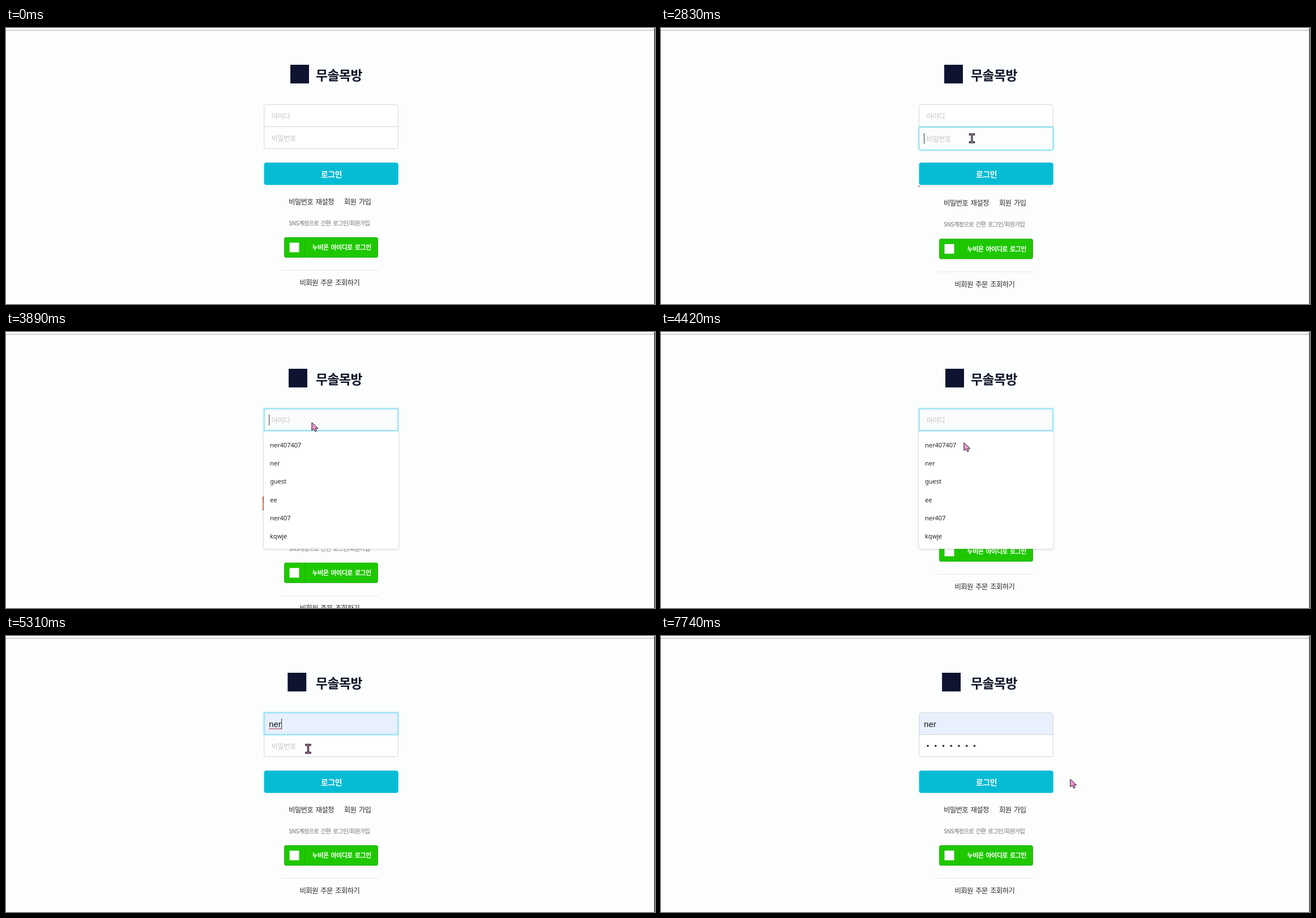
An HTML page for the animation above (8000 ms loop, 1148 by 488 pixels).

```html
<!DOCTYPE html>
<html lang="ko">
<head>
<meta charset="utf-8">
<title>Login</title>
<style>
html, body { margin: 0; width: 100%; height: 100%; overflow: hidden; background: #fcfdfd; }
svg { display: block; width: 1148px; height: 488px; }
text { font-family: "Noto Sans CJK KR", "Noto Sans CJK", sans-serif; white-space: pre; }
.md { font-size: 12.5px; letter-spacing: -.75px; word-spacing: 1.8px; fill: #2b2b2b; }
.hint { fill: #c3c5c6; font-weight: 500; }
.item { font: 11px "Noto Sans", "Open Sans", sans-serif; fill: #222; }
.typed { font: 15.5px Roboto, Inter, sans-serif; fill: #222; }
</style>
</head>
<body>
<svg viewBox="0 0 1148 488">
  <defs>
    <filter id="blur" x="-10%" y="-40%" width="120%" height="180%"><feGaussianBlur stdDeviation="1.6"/></filter>
    <linearGradient id="bar" x2="0" y2="1">
      <stop offset=".3" stop-color="#d9695d"/><stop offset=".5" stop-color="#ef9270"/><stop offset="1" stop-color="#df735f"/>
    </linearGradient>
    <clipPath id="panelClip"><rect id="panelBox" x="453.5" width="239"/></clipPath>
  </defs>
  <rect width="1148" height="488" fill="#fcfdfd"/>
  <path d="M0 4H1148" stroke="#a2a4a4" stroke-width="1.2"/>
  <path d="M1147.3 0V488" stroke="#26282a" stroke-width="1.4"/>

  <rect id="mark" y="65" width="33" height="33" fill="#0e1330"/>
  <text x="548" y="92.3" font-size="23" font-weight="900" letter-spacing="-.7" fill="#0d1528">무솔목방</text>

  <rect x="456.5" y="135.5" width="237" height="78" rx="4" fill="#fff" stroke="#d3d6d8"/>
  <path id="idFill" d="M457 174V139.5Q457 136 460.5 136H689.5Q693 136 693 139.5V174Z"/>
  <path d="M457 174.5H693" stroke="#d3d6d8"/>

  <g id="idFocus" fill="none">
    <rect x="456.5" y="135.5" width="237" height="39" rx="1" stroke="#a6e6f5" stroke-width="2" filter="url(#blur)"/>
    <rect x="456.5" y="135.5" width="237" height="39" rx="1" stroke="#72d9f0"/>
  </g>
  <g id="pwFocus">
    <rect x="456.5" y="175.5" width="237" height="40" rx="3" fill="none" stroke="#8fe0f3" stroke-width="2.6" filter="url(#blur)"/>
    <rect x="456.5" y="175.5" width="237" height="40" rx="3" fill="#fcfdfd" stroke="#62d5ee"/>
  </g>

  <text id="idHint" class="md hint" x="469.5" y="160.5">아이디</text>
  <text id="idText" class="typed" x="465" y="160.5">ner</text>
  <path id="squiggle" d="M465 164q1 -2.4 2 0t2 0t2 0t2 0t2 0t2 0t2 0t2 0t2 0t2 0t2 0" fill="none" stroke="#a8323e"/>
  <text id="pwHint" class="md hint" x="469.5">비밀번호</text>
  <g id="dots" fill="#222"></g>
  <path id="caret" stroke="#333"/>

  <rect id="button" x="456.5" y="238" width="237.5" height="39.5" rx="4"/>
  <text x="557" y="263.5" font-size="14" font-weight="700" letter-spacing="-.5" fill="#fff">로그인</text>

  <g id="panel" clip-path="url(#panelClip)">
    <rect x="453.5" y="291" width="238.5" height="27" rx="3" fill="#fde1dd"/>
    <path d="M458 291H456.5Q453.5 291 453.5 294V315Q453.5 318 456.5 318H458Z" fill="url(#bar)"/>
    <circle cx="526.5" cy="304.5" r="5" fill="#bd4a47"/>
    <path d="M526.5 301.5V305M526.5 306.3V307.6" stroke="#fff" stroke-width="1.3"/>
    <text x="535.5" y="308.6" font-size="10.5" letter-spacing="-.8" word-spacing="1.5" fill="#bd4a47">아이디를 입력해주세요</text>
  </g>

  <g id="lower">
    <text class="md" x="500" y="311.7">비밀번호 재설정</text>
    <text class="md" x="598" y="311.7">회원 가입</text>
    <text x="500" y="348.8" font-size="10.3" letter-spacing="-.65" word-spacing="1.5" fill="#707476">SNS계정으로 간편 로그인/회원가입</text>
    <rect x="492.5" y="370.5" width="165" height="35" rx="2.5" fill="#1ec800" stroke="#1cb004"/>
    <path d="M528.5 371V405" stroke="#1bb403"/>
    <rect x="501.5" y="379.5" width="17" height="17" fill="#fff"/>
    <text x="541.5" y="392.2" font-size="11.2" font-weight="700" letter-spacing="-.65" word-spacing="1.5" fill="#fff">누비온 아이디로 로그인</text>
    <path d="M486 428.5H659" stroke="#e6e8e8"/>
    <text class="md" x="519.5" y="455.2">비회원 주문 조회하기</text>
  </g>

  <g id="menu">
    <rect x="456" y="177" width="238.5" height="207" rx="4" fill="#0004" filter="url(#blur)"/>
    <rect x="456" y="176" width="238.5" height="207.5" rx="4" fill="#fff"/>
    <rect id="row" x="456" y="216" width="238.5" height="31.5" fill="#efefef"/>
  </g>

  <g id="arrow"><path d="M0 0V14L3.5 11L6 16L8.6 14.8L6.4 10.5H11Z" fill="#f09ad0" stroke="#1c1020" stroke-linejoin="round"/></g>
  <g id="beam" fill="none" stroke-linecap="square">
    <path d="M-3.5 -7H3.5M-3.5 7H3.5M0 -7V7" stroke="#1c1020" stroke-width="3.4"/>
    <path id="beamCore" d="M-3.5 -7H3.5M-3.5 7H3.5M0 -7V7" stroke-width="1.1"/>
  </g>
</svg>
<script>
const LOOP = 8000;
const PW_CLICK = 2690, ID_CLICK = 3830, PICK = 4710, TAB = 5470, BLUR = 7120;
const SVG = "http://www.w3.org/2000/svg";
const $ = id => document.getElementById(id);
const show = (id, on) => $(id).style.display = on ? "" : "none";
const set = (id, attrs) => { for (const k in attrs) $(id).setAttribute(k, attrs[k]); };
const clamp = v => Math.min(1, Math.max(0, v));
const swing = v => .5 - Math.cos(Math.PI * clamp(v)) / 2;
const within = (t, a, b) => t >= a && t < b;

function add(parent, tag, attrs, text = "") {
  const el = document.createElementNS(SVG, tag);
  for (const k in attrs) el.setAttribute(k, attrs[k]);
  el.textContent = text;
  $(parent).append(el);
}
["ner407407", "ner", "guest", "ee", "ner407", "kqwje"].forEach((name, i) =>
  add("menu", "text", { class: "item", x: 467, y: 203.6 + i * 32.3 }, name));
for (let i = 0; i < 7; i++) add("dots", "circle", { cx: 472 + i * 13.75, cy: 194.3, r: 1.8 });

// time, x, y
const path = [
  [400, 1090, 500], [1260, 548, 168.5], [1390, 548, 168.5], [1600, 552, 182], [1930, 543, 156],
  [2130, 543, 156], [2490, 550, 195], [3580, 550, 195], [3800, 541, 160], [3880, 541, 160],
  [4210, 536, 194.5], [4400, 536, 194.5], [4560, 533, 224], [4730, 533, 224], [5100, 534.5, 199.5],
  [5800, 534.5, 199.5], [6330, 571, 233], [6590, 592, 254], [7060, 592, 254], [7700, 724, 253]
];
function pointer(t) {
  const i = path.findIndex(p => p[0] > t);
  if (i === 0) return path[0].slice(1);
  if (i < 0) return path[path.length - 1].slice(1);
  const a = path[i - 1], b = path[i], k = swing((t - a[0]) / (b[0] - a[0]));
  return [a[1] + (b[1] - a[1]) * k, a[2] + (b[2] - a[2]) * k];
}

function draw(t) {
  const [x, y] = pointer(t);
  const idFocus = within(t, ID_CLICK, TAB);
  const pwFocus = within(t, PW_CLICK, ID_CLICK) || within(t, TAB, BLUR);
  const menu = within(t, ID_CLICK, PICK);
  const rowHover = menu && y > 214;
  const filled = t >= PICK || rowHover;
  const count = Math.floor(7 * clamp((t - 5600) / 560));

  // the mark slides aside and back, then rests
  const turn = clamp(((t - 460 + 2210) % 2210) / 1470);
  set("mark", { x: 503 - 6 * Math.sin(Math.PI * turn) });

  show("idFill", filled || idFocus);
  set("idFill", { fill: filled ? "#e8f0fe" : "#fafbfb" });
  show("idText", filled);
  show("idHint", !filled);
  show("squiggle", within(t, PICK, TAB));
  show("idFocus", idFocus);
  show("pwFocus", pwFocus);
  show("pwHint", count === 0);
  set("pwHint", { y: pwFocus ? 201 : 200 });
  [...$("dots").children].forEach((d, i) => d.style.display = i < count ? "" : "none");

  const since = t < ID_CLICK ? PW_CLICK : t < PICK ? ID_CLICK : 4850;
  const caretOn = t >= TAB || (t - since + 1000) % 1000 < 500;
  show("caret", (idFocus || pwFocus) && caretOn);
  const cx = idFocus ? (filled && !menu ? 487.5 : 465.5) : 465.5 + count * 13.75;
  set("caret", { d: `M${cx} ${idFocus ? 146 : 186}v19` });

  const open = swing((t - 2765) / 400) - swing((t - ID_CLICK) / 380);
  const top = 278 + 13 * open;
  show("panel", open > .001);
  set("panel", { transform: `translate(0 ${top - 291})` });
  set("panelBox", { y: 291, height: Math.max(0, 27 * open) });
  set("lower", { transform: `translate(0 ${40.2 * open})` });

  const hover = x > 456 && x < 694 && y > 238 && y < 277;
  set("button", { fill: hover ? "#06a9bf" : "#06bbd4" });
  show("menu", menu);
  show("row", rowHover);

  const beam = !menu && x > 457 && x < 693 && y > 136 && y < 214;
  show("beam", beam);
  show("arrow", !beam && t >= 460);
  set(beam ? "beam" : "arrow", { transform: `translate(${x} ${y})` });
  set("beamCore", { stroke: within(t, 2490, 3580) ? "#c9c5c9" : "#e391c2" });
}

let start;
function tick(now) {
  start ??= now;
  draw((now - start) % LOOP);
  requestAnimationFrame(tick);
}
draw(0);
requestAnimationFrame(tick);
</script>
</body>
</html>
```
